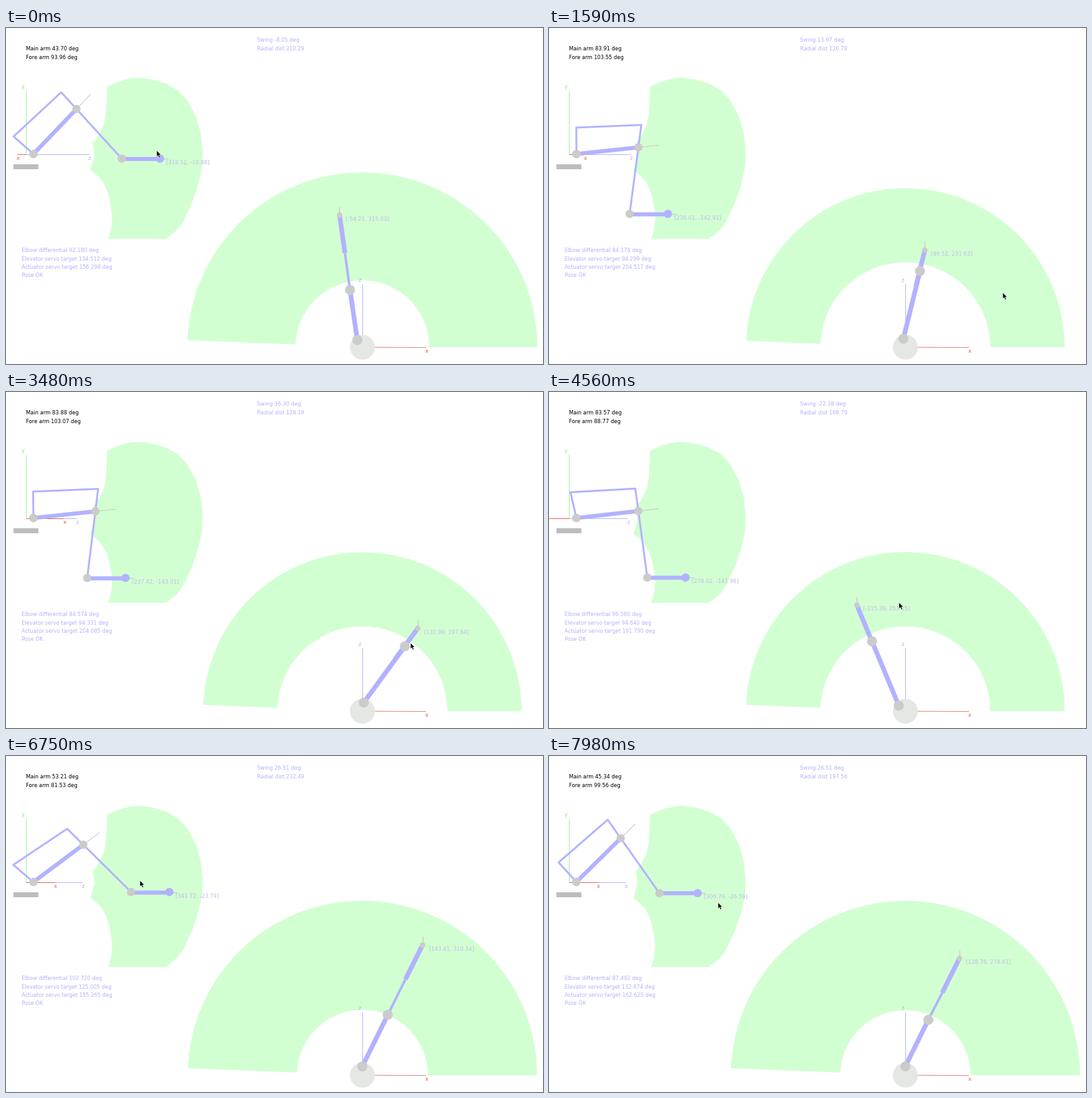
Write a matplotlib script that moves like this. It is 862 px wide and 540 px high and loops after 8 s.

```python
import math

import numpy as np
import matplotlib.pyplot as plt
from matplotlib.animation import FuncAnimation
from matplotlib.patches import Circle, Polygon, Rectangle, Wedge

W, H, DPI = 862, 540, 80
FRAMES, STEP = 250, 32
PT = 72 / DPI

# arm dimensions in model units
SCALE = 0.674
MAIN, FORE, REACH, HAND = 148.4, 160.0, 109.23, 91.2
CRANK, TAIL = 63.0, 54.0
AXIS = 102

PURPLE, GREEN, GREY = "#b2b2ff", "#d2ffd2", "#cbcbcb"
LABEL, THIN, RED = "#bcbce6", "#b9b9c0", "#ee5a4a"

SHOULDER = np.array([44.0, 202.5])
BASE = np.array([572.0, 513.0])

# left and right borders of the reachable area, from top to bottom
LEFT_Y = [95, 125, 140, 155, 168, 178, 185, 196, 206, 214, 228, 235, 245, 258, 272, 290, 305, 322, 339]
LEFT_X = [162, 161, 160, 157, 151, 145, 139, 141, 142, 140, 135.5, 144, 154, 161, 165.5, 169, 170.5, 169, 164]
RIGHT_Y = [80, 83, 89, 100, 116, 140, 168, 200, 225, 250, 280, 299, 312, 325, 339]
RIGHT_X = [215, 236, 256, 276, 291, 304, 312.5, 316, 314.5, 309, 299, 290, 284, 274, 257]
TOP = [(162, 95), (175, 88.5), (187, 84), (204, 80.5)]


def track(*keys):
    """Smooth curve through (seconds, value) keys without overshoot."""
    t, v = np.array(keys, float).T
    slope = np.diff(v) / np.diff(t)
    m = np.zeros(len(t))
    m[0], m[-1] = slope[0], slope[-1]
    for i in range(1, len(t) - 1):
        a, b = slope[i - 1], slope[i]
        m[i] = 2 * a * b / (a + b) if a * b > 0 else 0

    def at(x):
        i = int(np.clip(np.searchsorted(t, x, side="right") - 1, 0, len(t) - 2))
        h = t[i + 1] - t[i]
        u = min((x - t[i]) / h, 1)
        return ((1 + 2 * u) * (1 - u) ** 2 * v[i] + u * (1 - u) ** 2 * h * m[i]
                + u * u * (3 - 2 * u) * v[i + 1] + u * u * (u - 1) * h * m[i + 1])
    return at


main_deg = track((0, 43.70), (0.4, 52), (0.83, 65), (1.15, 79), (1.59, 83.93), (3.48, 83.88),
                 (4.56, 83.57), (5.6, 83.5), (5.82, 64.76), (6.25, 52), (6.75, 53.22), (7.98, 45.26))
fore_deg = track((0, 93.96), (0.83, 95), (1.59, 103.57), (2.3, 102), (3.48, 103.07),
                 (4.56, 88.76), (5.6, 90), (5.82, 92.10), (6.75, 81.50), (7.98, 99.74))
swing_deg = track((0, -8.05), (0.83, -8.05), (1.59, 15), (2.15, 72), (2.45, 60), (3.48, 35.73),
                  (3.8, 28), (4.4, -23), (4.56, -22.24), (5.25, 20), (5.82, 26.41),
                  (6.1, 26.51), (7.98, 26.51))
side_shift = track((0, 9.56), (1.59, 10.79), (3.48, 10.62), (4.56, 10.33), (5.82, 9.16),
                   (6.75, 10.19), (7.98, 9.13))
mouse_x = track((0, 242), (0.8, 255), (1.59, 732), (2.1, 765), (2.45, 715), (3.48, 647),
                (4.3, 505), (4.56, 565), (5.1, 640), (5.6, 290), (5.82, 250), (6.75, 215), (7.98, 272))
mouse_y = track((0, 197), (0.8, 290), (1.59, 428), (2.1, 470), (2.45, 440), (3.48, 402),
                (4.3, 345), (4.56, 338), (5.1, 320), (5.6, 250), (5.82, 175), (6.75, 201), (7.98, 236))

fig = plt.figure(figsize=(W / DPI, H / DPI), dpi=DPI, facecolor="white")
ax = fig.add_axes([0, 0, 1, 1])
ax.set_xlim(0, W)
ax.set_ylim(H, 0)
ax.axis("off")


def line(width, color, *points):
    item, = ax.plot([], [], color=color, lw=width * PT, solid_capstyle="butt",
                    solid_joinstyle="round")
    if points:
        join(item, *points)
    return item


def join(item, *points):
    item.set_data(*zip(*points))


def disc(radius, color, center=(0, 0)):
    return ax.add_patch(Circle(center, radius, fc=color, lw=0, zorder=2))


def text(x, y, s="", color=PURPLE, size=8.35, **kw):
    return ax.text(x, y, s, color=color, fontsize=size * PT, family="DejaVu Sans",
                   va="baseline", **kw)


# reachable areas
ax.add_patch(Polygon(TOP + list(zip(RIGHT_X, RIGHT_Y)) + list(zip(LEFT_X, LEFT_Y))[::-1],
                     fc=GREEN, lw=0))
fan = ax.add_patch(Wedge(BASE, 281, 182.3, 360, width=172, fc=GREEN, lw=0))

# side view
line(1, "#9cee9c", (32, 202.5), (32, 101))
text(27.5, 97, "y", "#7df07d", ha="center")
axis_z, axis_x = line(1, PURPLE), line(1, RED)
name_z = text(0, 212, "z", ha="center")
name_x = text(0, 212, "x", RED, ha="center")
ax.add_patch(Rectangle((11.5, 219), 40.5, 7.5, fc="#bdbdbd", lw=0))
guide, tip_guide = line(0.8, THIN), line(0.8, THIN)
linkage, main_arm, hand = line(3, PURPLE), line(6.5, PURPLE), line(6.5, PURPLE)
disc(6.8, GREY, SHOULDER)
elbow_dot, wrist_dot, tip_dot = disc(6.6, GREY), disc(6.6, GREY), disc(6.6, PURPLE)
side_label = text(0, 0, color=LABEL, size=8.6)

# top view
line(1, "#dc8070", BASE, (674, 513.5))
line(1, PURPLE, BASE, (572, 411))
text(675, 522, "x", RED, ha="center")
text(567.5, 407.5, "z", ha="center")
disc(20, "#e5e7e5", BASE)
top_guide = line(0.9, THIN)
top_fore, top_main, top_hand = line(4, PURPLE), line(7.5, PURPLE), line(7.5, PURPLE)
top_dots = [disc(8, GREY), disc(8, GREY), disc(4.4, GREY)]
top_label = text(0, 0, color=LABEL, size=8.6)

# readouts
main_text = text(31.5, 36, color="black")
fore_text = text(31.5, 49.5, color="black")
swing_text, dist_text = text(403, 22.5), text(403, 36)
diff_text, lift_text, act_text = (text(25, 360 + 13.5 * i) for i in range(3))
text(25, 400.5, "Pose OK")

ARROW = np.array([(0, 0), (0, 9.6), (2.2, 7.6), (3.9, 11.2), (5.5, 10.4), (3.9, 7), (6.8, 6.8)])
pointer = ax.add_patch(Polygon(ARROW, fc="black", ec="white", lw=0.4, zorder=9))


def polar(length, deg):
    """Screen offset for a length turned clockwise from straight up."""
    r = math.radians(deg)
    return length * SCALE * np.array([math.sin(r), -math.cos(r)])


def draw_side(a, b, diff, swing):
    elbow = SHOULDER + polar(MAIN, a)
    wrist = elbow + polar(FORE, a + b)
    tip = wrist + (HAND * SCALE, 0)
    join(linkage, SHOULDER, SHOULDER + polar(CRANK, a - diff),
         elbow - polar(TAIL, a + b), wrist)
    join(main_arm, SHOULDER, elbow)
    join(hand, wrist, tip)
    join(guide, elbow, elbow + polar(49, a))
    join(tip_guide, tip, tip + (13, 0))
    for dot, p in zip((elbow_dot, wrist_dot, tip_dot), (elbow, wrist, tip)):
        dot.center = p

    s = math.radians(swing)
    for item, name, end, gap in ((axis_z, name_z, 32 + AXIS * math.cos(s), 1),
                                 (axis_x, name_x, 32 + AXIS * math.sin(s), 1.6)):
        join(item, (32, 202.8), (end, 202.8))
        name.set_x(end + gap)
    name_x.set_visible(name_x.get_position()[0] > 2)
    side_label.set_position(tip + (10, 9))
    return wrist[1]


def draw_top(a, reach, swing, shift, height):
    def place(forward, side):
        return BASE + polar(forward, swing) + polar(side, swing - 90)

    pivot = place(18.5, 9.4)
    elbow = place(37 + MAIN * math.sin(math.radians(a)), 10)
    wrist, tip = place(reach - HAND, shift), place(reach, shift)
    join(top_main, pivot, elbow)
    join(top_fore, elbow, wrist)
    join(top_hand, wrist, tip)
    join(top_guide, tip, tip - (0, 13.5))
    for dot, p in zip(top_dots, (pivot, elbow, tip)):
        dot.center = p
    top_label.set_position(tip + (10, 9))
    x, z = (tip - BASE) / SCALE
    top_label.set_text(f"[{x:.2f}, {-z:.2f}]")

    outer = np.interp(height, RIGHT_Y, RIGHT_X) - 34.5
    inner = np.interp(height, LEFT_Y, LEFT_X) - 33.5
    fan.set_radius(outer)
    fan.set_width(outer - inner)


def update(i):
    t = i * STEP / 1000
    a, b, swing = main_deg(t), fore_deg(t), swing_deg(t)
    diff = 102.748 - 0.84925 * (b - 81.5) + 0.000604 * (b - 81.5) * (b - 92.1)
    ra, rc = math.radians(a), math.radians(180 - a - b)
    dist = MAIN * math.sin(ra) + FORE * math.sin(rc)
    rise = MAIN * math.cos(ra) - FORE * math.cos(rc)

    height = draw_side(a, b, diff, swing)
    draw_top(a, dist + REACH, swing, side_shift(t), height)
    side_label.set_text(f"[{dist + REACH:.2f}, {rise:.2f}]")
    main_text.set_text(f"Main arm {a:.2f} deg")
    fore_text.set_text(f"Fore arm {b:.2f} deg")
    swing_text.set_text(f"Swing {swing:.2f} deg")
    dist_text.set_text(f"Radial dist {dist:.2f}")
    diff_text.set_text(f"Elbow differential {diff:.3f} deg")
    lift_text.set_text(f"Elevator servo target {178.212 - a:.3f} deg")
    act_text.set_text(f"Actuator servo target {204.778 + a - diff:.3f} deg")
    pointer.set_xy(ARROW + (mouse_x(t), mouse_y(t)))
    return []


anim = FuncAnimation(fig, update, frames=FRAMES, interval=STEP, init_func=lambda: update(0),
                     repeat=True, repeat_delay=0, blit=False)
plt.show()
```
